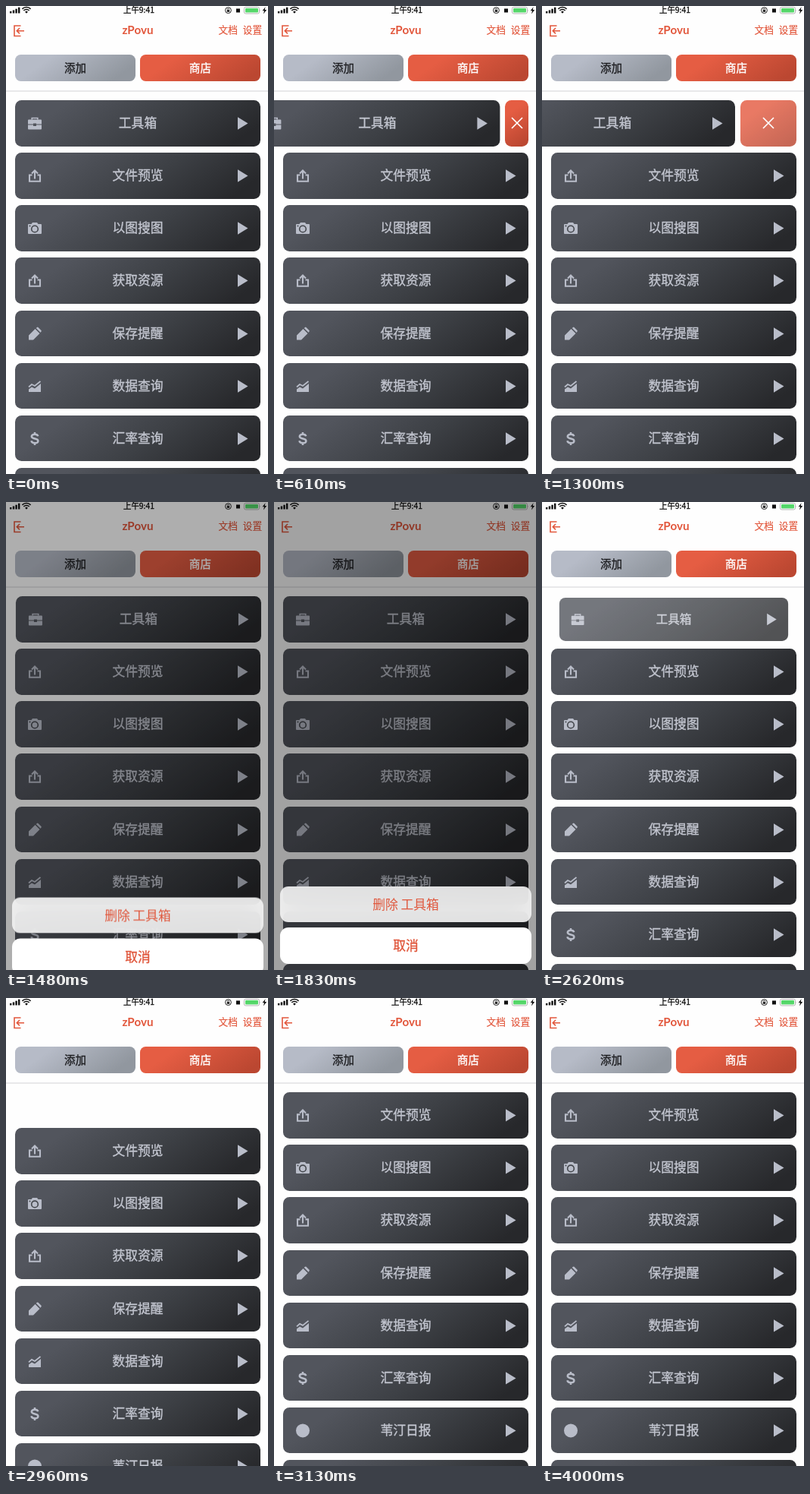
An HTML page for the animation above (4.1 s loop, 346 by 616 pixels).

```html
<!DOCTYPE html>
<html lang="zh-CN">
<head>
<meta charset="utf-8">
<title>列表删除</title>
<style>
html, body { margin: 0; width: 100%; height: 100%; overflow: hidden; background: #fefefe; }
#stage {
  position: relative; width: 346px; height: 616px; overflow: hidden; background: #fefefe;
  font-family: "Noto Sans CJK SC", "Noto Sans CJK", sans-serif;
}
#stage > *, .row > * { position: absolute; }
#chrome { left: 0; top: 0; }
.btn, .row, #sheet .no { -webkit-text-stroke: .35px; }
.btn {
  top: 63.6px; width: 159px; height: 35.4px; border-radius: 7.5px;
  font-size: 14.5px; line-height: 33px; text-align: center;
}
.add { left: 12px; color: #202124; background: linear-gradient(145deg, #b6bbc7 25%, #91979f 85%); }
.shop { left: 177px; color: #fff; background: linear-gradient(145deg, #e55d43 25%, #bb4731 90%); }
#rule { left: 0; top: 111px; width: 346px; height: 2px; background: #e8e8ea; }
#list { left: 0; top: 113px; width: 346px; height: 503px; overflow: hidden; }
.row {
  position: absolute; left: 12px; width: 324px; height: 60.7px; border-radius: 8.5px;
  background: linear-gradient(145deg, #52555d 18%, #3d4045 55%, #27282b 90%);
  color: #c3c6d0; font-size: 16.8px; line-height: 59.4px; text-align: center;
}
.row span { left: 0; right: 0; }
.row svg { left: 0; top: 0; }
#del {
  position: absolute; top: 11.1px; height: 60.7px; border-radius: 8.5px; overflow: hidden;
  background: linear-gradient(145deg, #e55d43 25%, #bb4731 90%);
}
#del svg { position: absolute; left: 50%; top: 50%; margin: -10px; }
#dim { inset: 0; background: #000; }
#sheet { left: 8px; top: 505.5px; width: 332px; color: #e0563b; font-size: 16.8px; text-align: center; }
#sheet div { height: 47.6px; line-height: 46px; border-radius: 11px; margin-bottom: 6.9px; }
#sheet .ok { background: rgba(248,248,248,.89); backdrop-filter: blur(14px); }
#sheet.hit .ok { background: rgba(243,243,243,.88); }
#sheet .no { background: #fff; }
</style>
</head>
<body>
<div id="stage">
  <svg id="chrome" width="346" height="112">
    <g fill="#111">
      <path d="M5 7h2.4v2.5H5zM8.8 5.6h2.4v3.9H8.8zM12.4 3.8h2.4v5.7h-2.4zM16 1.8h2.4v7.7H16z"/>
      <path d="M27 9.8l-1.9-2.1a2.8 2.8 0 0 1 3.8 0z"/>
      <g fill="none" stroke="#111" stroke-width="1.5">
        <path d="M23.3 6a5.3 5.3 0 0 1 7.4 0M21.4 3.9a8 8 0 0 1 11.2 0"/>
      </g>
      <text x="175.5" y="9" font-size="10.4" text-anchor="middle" stroke="#111" stroke-width=".3">上午9:41</text>
      <circle cx="293.5" cy="5.7" r="3.9" fill="none" stroke="#222" stroke-width="1"/>
      <path d="M291.8 5.2h3.4v2.6h-3.4z"/>
      <path d="M292.4 5.2v-.8a1.1 1.1 0 0 1 2.2 0v.8" fill="none" stroke="#111" stroke-width=".7"/>
      <rect x="304" y="3.5" width="5" height="5"/>
      <rect x="314.5" y="1.5" width="20" height="8.5" rx="2" fill="none" stroke="#b4b4b4"/>
      <rect x="316" y="3" width="17" height="5.5" rx="1" fill="#54d769"/>
      <path d="M335.5 4.2q1.3 1.5 0 3z" fill="#b4b4b4"/>
      <path d="M342.6 1.3l-4 5h2.4l-1 4.2 4.2-5.4h-2.5z"/>
    </g>
    <g fill="#e2573c">
      <path d="M19.5 26H11v13.5h8.5M24 32.7H14.5M18 29l-3.7 3.7 3.7 3.7" fill="none" stroke="#e2573c" stroke-width="1.6"/>
      <text x="174" y="37" font-size="15.2" text-anchor="middle" style="font-family:Lato,sans-serif;font-weight:700">zPovu</text>
      <g font-size="12.7" stroke="#e2573c" stroke-width=".2">
        <text x="280.6" y="36.2">文档</text>
        <text x="312.8" y="36.2">设置</text>
      </g>
    </g>
  </svg>
  <div class="btn add">添加</div>
  <div class="btn shop">商店</div>
  <div id="rule"></div>
  <div id="list">
    <div id="del"><svg width="20" height="20"><path d="M3 3l14 14M17 3L3 17" stroke="#fff" stroke-width="1.7"/></svg></div>
  </div>
  <div id="dim"></div>
  <div id="sheet"><div class="ok">删除 工具箱</div><div class="no">取消</div></div>
</div>
<script>
const LOOP = 4100, TICK = 87;      // the screen refreshes about 11.5 times a second
const TOP = 11.1, PITCH = 69.1, OPEN = 81;
const $ = id => document.getElementById(id);

const line = (d, w) => `<path d="${d}" fill="none" stroke="#b9bdc9" stroke-width="${w}"/>`;
const fill = d => `<path d="${d}"/>`;
const icons = {
  box: fill('M-8-5H8q1 0 1 1V1H2V0H-2V1H-9V-4q0-1 1-1zM-9 2H-2V3.5H2V2H9V7q0 1-1 1H-8q-1 0-1-1z') +
    line('M-3.8-5V-7H3.8V-5', 1.6),
  share: line('M-3.5-1H-7V7.3H7V-1H3.5M0 4V-6M-4-3L0-7L4-3', 2.1),
  camera: fill('M-8-5.5H-4.5L-3-7.5H3L4.5-5.5H8q1 0 1 1V6.5q0 1-1 1H-8q-1 0-1-1V-4.5q0-1 1-1z') +
    '<circle cy="1" r="4.3" fill="none" stroke="#44474d" stroke-width="1.6"/><circle cx="-6.5" cy="-3" r="1" fill="#44474d"/>',
  pencil: fill('M-8 8V2L.5-6.5L6.5-.5L-2 8zM1.7-7.6L3-8.6q.8-.6 1.5 0L8.5-4.6q.6.7 0 1.5L7.6-1.7z'),
  chart: fill('M-8 7.5V4L-4 1L0 3L8-3.5V7.5z') + line('M-8 1L-4-2.5L0-.5L7.5-6.5', 1.8),
  dollar: line('M4.3-3.2C3.8-5.2 2-5.7 0-5.7c-2.4 0-4.2 1-4.2 2.8C-4.2 1.2 4.4-1 4.4 3' +
    'c0 1.9-2 2.8-4.4 2.8c-2.4 0-4.2-1-4.6-3M0-8.5V-5.5M0 5.5V8.5', 2.5),
  dot: '<circle r="9"/>'
};
const items = [
  ['工具箱', 'box'], ['文件预览', 'share'], ['以图搜图', 'camera'], ['获取资源', 'share'],
  ['保存提醒', 'pencil'], ['数据查询', 'chart'], ['汇率查询', 'dollar'], ['苇汀日报', 'dot'], ['', 'dot']
];
const rows = items.map(([label, icon], i) => {
  const row = document.createElement('div');
  row.className = 'row';
  row.style.top = TOP + i * PITCH + 'px';
  row.innerHTML = `<svg width="324" height="61" fill="#b9bdc9"><g transform="translate(26 30.5)">${icons[icon]}</g>` +
    `<path d="M294 22.3L307.5 30.5L294 38.7z"/></svg><span>${label}</span>`;
  $('list').append(row);
  return row;
});

const ease = (t, from, to) => {
  const p = Math.min(1, Math.max(0, (t - from) / (to - from)));
  return p * p * (3 - 2 * p);
};
// critically damped spring, 0 to 1
const spring = (t, from) => { const x = Math.max(0, t - from) * .0204; return 1 - (1 + x) * Math.exp(-x); };
// slightly bouncing return, 1 to 0
const bounce = (t, from) => { const u = Math.max(0, t - from) / 84; return Math.exp(-1.8 * u) * Math.cos(u); };

function draw(time) {
  const t = Math.floor((time + 5) / TICK) * TICK;

  const swipe = OPEN * ease(t, 290, 960) * bounce(t, 1305);
  const gone = ease(t, 2523, 2823);
  const first = rows[0].style;
  first.transform = `translateX(${-swipe}px) scale(${1 - .33 * gone})`;
  first.opacity = 1 - gone;

  const del = $('del').style;
  const width = Math.max(0, swipe - 7);
  del.left = 336 - width + 'px';
  del.width = width + 'px';
  del.opacity = t >= 1305 ? .82 : 1;

  const lift = PITCH * ease(t, 2863, 3115);
  rows.slice(1).forEach(row => row.style.transform = `translateY(${-lift}px)`);

  const shown = spring(t, 1305) - spring(t, 2150);
  $('dim').style.opacity = .365 * shown;
  $('sheet').style.transform = `translateY(${111 * (1 - shown)}px)`;
  $('sheet').style.visibility = shown > .004 ? 'visible' : 'hidden';
  $('sheet').className = t >= 2088 ? 'hit' : '';
}

const start = performance.now();
function loop() {
  draw((performance.now() - start) % LOOP);
  requestAnimationFrame(loop);
}
loop();
</script>
</body>
</html>
```
